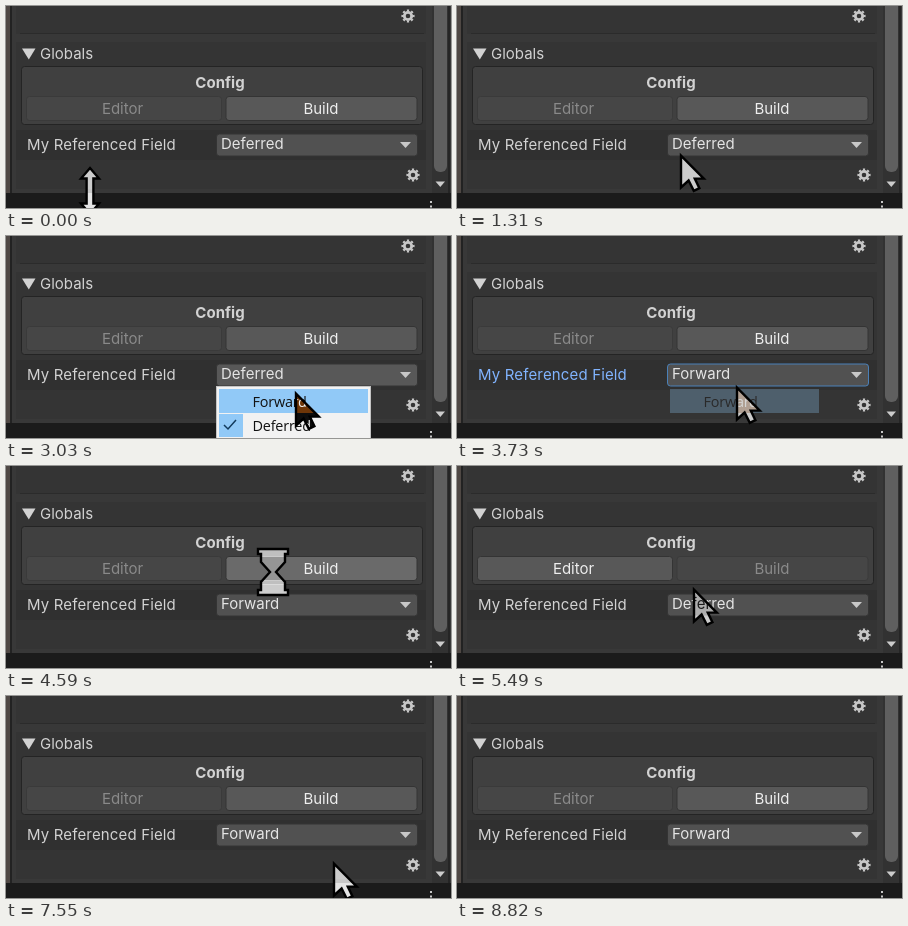
Recreate the animation shown at these times as an HTML page. Size 445 px wide and 202 px high, loop 9290 ms.

```html
<!DOCTYPE html>
<html lang="en">
<head>
<meta charset="utf-8">
<title>Inspector dropdown</title>
<style>
  html, body { margin: 0; width: 100%; height: 100%; overflow: hidden; background: #383838; }
  svg { display: block; width: 445px; height: 202px; }
  text { font: 15px Inter, sans-serif; fill: #d2d2d2; white-space: pre; }
  .mid { text-anchor: middle; }
  .bold { font-weight: 700; }
  .label { letter-spacing: .15px; }
  .button rect { fill: #585858; stroke: #343434; }
  .button text { fill: #eee; }
  .button.off rect { fill: #464646; stroke: #3a3a3a; }
  .button.off text { fill: #8a8a8a; }
  .button.down rect { fill: #6a6a6a; }
  .field rect { fill: #515151; stroke: #343434; }
  .field text { fill: #e4e4e4; }
  .open .field rect { fill: #585858; }
  .focus .field rect { stroke: #4a80b8; }
  .focus .label { fill: #81b4ff; }
  .menu text { font: 14.4px "Open Sans", sans-serif; letter-spacing: -.2px; fill: #111; }
  .hot { fill: #91c9f7; }
  .invert { fill: #fff; mix-blend-mode: difference; }
  .edge { fill: none; stroke: #000; stroke-width: 2.4; }
</style>
</head>
<body>
<svg viewBox="0 0 445 202">
  <defs>
    <g id="gear" fill="none" stroke="#c8c8c8">
      <circle r="3.7" stroke-width="2.8"/>
      <circle r="5.6" stroke-width="2" pathLength="16" stroke-dasharray="1 1" stroke-dashoffset=".5"/>
    </g>
    <path id="arrow" d="M1 2.6V34.5L8.600 27.500L13.800 37.800L19.400 35.200L14.800 25.600H23.800Z"/>
    <path id="resize" d="M0-23L9-12.500H3.400V12.500H9L0 23L-9 12.500H-3.400V-12.500H-9Z"/>
    <path id="wait" d="M-15-23H15V-18H12V-10L3 0L12 10V18H15V23H-15V18H-12V10L-3 0L-12-10V-18H-15Z"/>
  </defs>

  <g id="panel">
    <rect width="445" height="202" fill="#383838"/>
    <rect width="5" height="187" fill="#4f4844"/>
    <rect x="4" width="2" height="187" fill="#222"/>
    <rect x="10" width="410" height="28" fill="#343434"/>
    <path d="M14 27.500H418" stroke="#2b2b2b"/>
    <rect x="10" y="36" width="410" height="147" fill="#343434"/>
    <rect x="10" y="124" width="410" height="30" fill="#303030"/>
    <rect x="15.500" y="60.500" width="401" height="58" rx="3" fill="#404040" stroke="#242424"/>
    <path d="M16 42.500H29.500L22.800 53.500Z" fill="#d2d2d2"/>
    <text x="34" y="53">Globals</text>
    <text class="mid bold" x="214" y="82">Config</text>
    <g class="button" id="editor">
      <rect x="20.500" y="90.500" width="195" height="24" rx="3"/>
      <text class="mid" x="116.500" y="108">Editor</text>
    </g>
    <g class="button" id="build">
      <rect x="220" y="90.500" width="191" height="24" rx="3"/>
      <text class="mid" x="315" y="108">Build</text>
    </g>
    <text class="label" x="21" y="144">My Referenced Field</text>
    <g class="field">
      <rect x="210.500" y="128" width="201" height="22" rx="3"/>
      <text id="value" x="215" y="143"></text>
      <path d="M394 136H405L399.500 142Z" fill="#c8c8c8"/>
    </g>
    <use href="#gear" x="402" y="10"/>
    <use href="#gear" x="407" y="169"/>

    <rect x="426" width="16" height="187" fill="#323232"/>
    <rect x="428" y="-10" width="13" height="176" rx="6" fill="#5f5f5f"/>
    <path d="M429.500 175.500H439L434.300 181Z" fill="#ccc"/>
    <rect x="442" width="2" height="187" fill="#252525"/>
    <rect y="187" width="445" height="15" fill="#1b1b1b"/>
    <path d="M425 195V202" stroke="#c8c8c8" stroke-width="2" stroke-dasharray="2 2.500"/>
  </g>

  <g class="menu" id="menu">
    <rect x="210.500" y="150.500" width="154" height="60" fill="#f2f2f2" stroke="#c4c4c4"/>
    <rect class="hot" x="213" y="178" width="24" height="23"/>
    <path d="M218 189L222 193L230 184" fill="none" stroke="#123a5c" stroke-width="1.500"/>
    <rect class="hot" id="hover" x="213" y="153" width="149" height="24"/>
    <text x="246.500" y="171">Forward</text>
    <text x="246.500" y="195">Deferred</text>
  </g>
  <g class="menu" id="ghost">
    <rect class="hot" x="213" y="153" width="149" height="24"/>
    <text x="246.500" y="171">Forward</text>
  </g>

  <use class="cursor invert"/>
  <use class="cursor edge"/>
</svg>
<script>
  const LOOP = 9290, STEP = 50;
  const $ = id => document.getElementById(id);
  const cursors = document.querySelectorAll('.cursor');
  const within = (t, a, b) => t >= a && t < b;
  const show = (el, on) => el.setAttribute('visibility', on ? 'visible' : 'hidden');

  // Pointer strokes: straight, or bent towards `via`.
  const home = [84, 182];
  const moves = [
    { start: 660, end: 1560, to: [290, 148], via: [154, 139] },
    { start: 1610, end: 1760, to: [315, 147] },
    { start: 2260, end: 2610, to: [296, 143] },
    { start: 2910, end: 3180, to: [280, 168] },
    { start: 3730, end: 4180, to: [267, 106], via: [277, 64] },
    { start: 4640, end: 4890, to: [285, 167] },
    { start: 5390, end: 5690, to: [168, 104], via: [228, 97] },
    { start: 6240, end: 6540, to: [200, 161] },
    { start: 7150, end: 7550, to: [327, 165] },
    { start: 7960, end: 8010, to: [347, 168] },
    { start: 8160, end: 8310, to: [396, 167] }
  ];

  function pointerAt(t) {
    let pos = home;
    for (const { start, end, to, via } of moves) {
      if (t < start) break;
      const passed = Math.floor((t - start) / STEP + 1) * STEP;
      const u = Math.min(1, passed / (end - start + STEP));
      pos = pos.map((from, i) => {
        const mid = via ? via[i] : (from + to[i]) / 2;
        return (1 - u) ** 2 * from + 2 * u * (1 - u) * mid + u * u * to[i];
      });
    }
    return pos;
  }

  function cursorAt(t) {
    if (t < 50) return 'resize';
    return within(t, 4490, 4640) || within(t, 6090, 6240) ? 'wait' : 'arrow';
  }

  function render(t) {
    const [x, y] = t < 50 ? [84, 185] : pointerAt(t);
    const open = within(t, 2210, 3580);
    const building = within(t, 4640, 6240);

    for (const c of cursors) {
      c.setAttribute('href', '#' + cursorAt(t));
      c.setAttribute('x', Math.round(x));
      c.setAttribute('y', Math.round(y));
      show(c, t < 8820);
    }

    $('value').textContent = t < 3580 || building ? 'Deferred' : 'Forward';
    $('panel').classList.toggle('open', open);
    $('panel').classList.toggle('focus', within(t, 3580, 4490));
    $('editor').classList.toggle('off', !building);
    $('editor').classList.toggle('down', within(t, 5940, 6240));
    $('build').classList.toggle('off', building);
    $('build').classList.toggle('down', within(t, 4490, 4640));

    show($('menu'), open);
    show($('hover'), open && y > 150);
    show($('ghost'), within(t, 3580, 3800));
    $('ghost').setAttribute('opacity', Math.max(0, 1 - (t - 3560) / 240));
  }

  function tick() {
    render(performance.now() % LOOP);
    requestAnimationFrame(tick);
  }
  tick();
</script>
</body>
</html>
```
